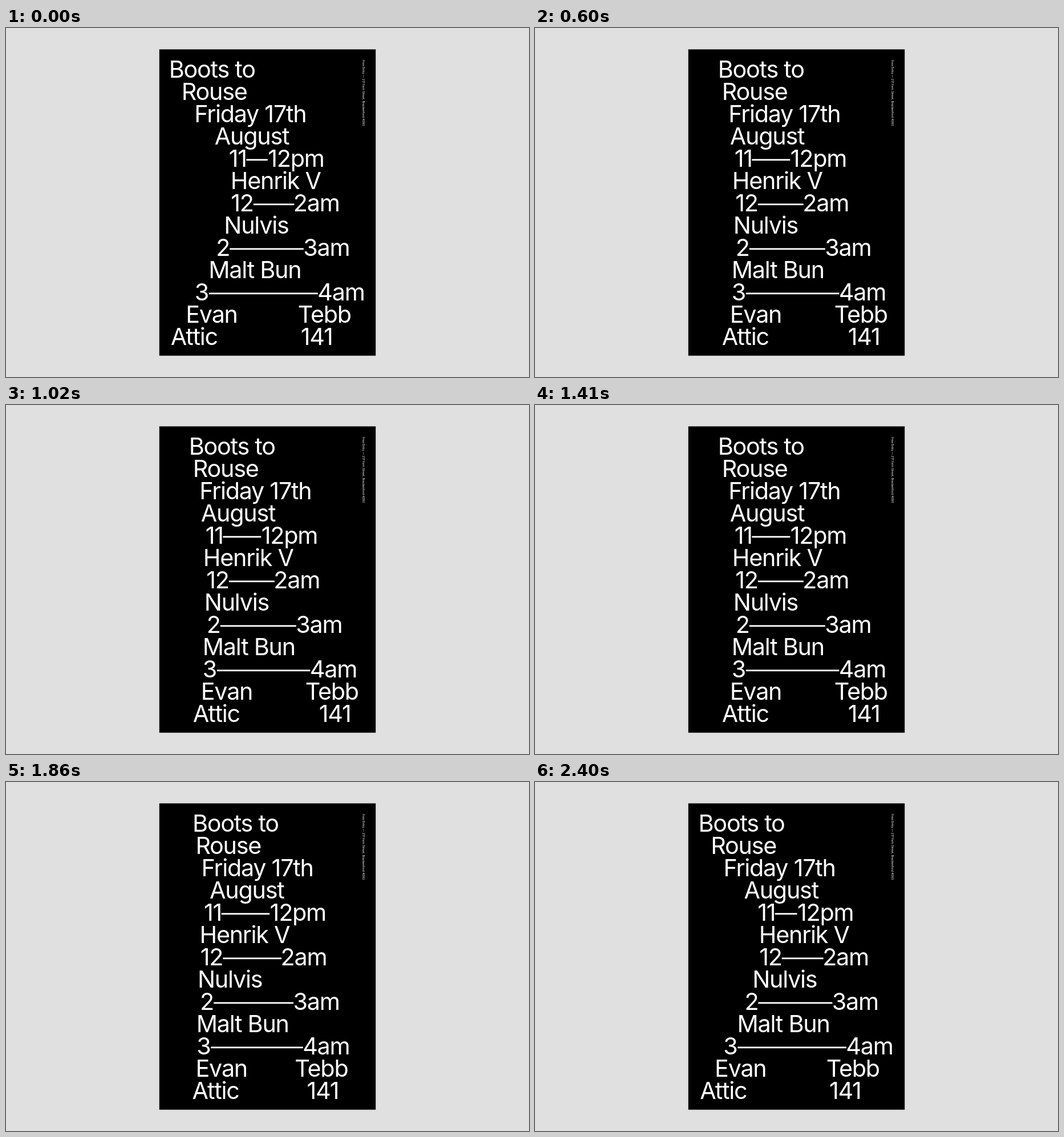
Animation, 917 px wide and 611 px high, one loop 2.43 s. Source, as an HTML page with a canvas:

```html
<!DOCTYPE html>
<html lang="en">
<head>
<meta charset="utf-8">
<style>
  html, body { margin: 0; width: 100%; height: 100%; overflow: hidden; background: #e0e0e0; }
  canvas { display: block; }
</style>
</head>
<body>
<canvas width="917" height="611"></canvas>
<script>
const ctx = document.querySelector('canvas').getContext('2d');
const STEP = 30, CYCLE = 27;
const FIRST_BASELINE = 86.7, LINE_HEIGHT = 39, INSET = 0.8;

// Each part: text, then its left edge at the start, middle and end of the swing.
const lines = [
  [['Boots to', 288, 323, 345]],
  [['Rouse', 310, 330, 348]],
  [['Friday 17th', 332.5, 341.5, 355.5]],
  [['August', 366, 342, 424]],
  [['11', 391, 350, 346], ['12pm', 459.5, 448, 524.5]],
  [['Henrik V', 396, 348, 328]],
  [['12', 394.5, 351.5, 309.5], ['2am', 506, 471.5, 541]],
  [['Nulvis', 384.5, 350, 299.5]],
  [['2', 370.5, 354, 299.5], ['3am', 522.5, 509.5, 489]],
  [['Malt Bun', 357.5, 347, 294]],
  [['3', 332, 346, 290.5], ['4am', 547.5, 534, 474.5]],
  [['Evan', 317.5, 344, 291.5], ['Tebb', 512, 525, 430]],
  [['Attic', 289, 328, 312], ['141', 517, 549, 435.5]]
];

const ease = k => (1 - Math.cos(2 * Math.PI * k / CYCLE)) / 2;
const bump = s => 16 * s * s * (1 - s) ** 2;
const MID = ease(7), LATE = ease(12);

// Eased swing between two poses, bowed so that it passes the middle one.
function edgeAt([, start, middle, end], s) {
  const travel = (end - start) / LATE;
  const bow = (middle - start - travel * MID) / bump(MID);
  return INSET + start + travel * s + bow * bump(s);
}

function setFont(size, spacing) {
  ctx.font = `${size}px Inter, "Liberation Sans", sans-serif`;
  ctx.letterSpacing = spacing + 'px';
}

// Draws text with its ink starting at x and returns where the ink ends.
function drawWord(text, x, y) {
  const box = ctx.measureText(text);
  const origin = x + box.actualBoundingBoxLeft;
  ctx.fillText(text, origin, y);
  return origin + box.actualBoundingBoxRight;
}

function drawPoster() {
  ctx.fillStyle = '#e0e0e0';
  ctx.fillRect(0, 0, 917, 611);
  ctx.fillStyle = '#000';
  ctx.fillRect(268.8, 37.4, 379.4, 536.3);
  ctx.fillStyle = '#fff';
  ctx.save();
  ctx.translate(625, 56);
  ctx.rotate(Math.PI / 2);
  setFont(5.25, -0.08);
  ctx.fillText('Free Entry — 217 Fern Street, Brackenford 4093', 0, 0);
  ctx.restore();
}

function draw(now) {
  const s = ease(Math.floor(now / STEP) % CYCLE);
  drawPoster();
  setFont(41.3, -1.25);
  lines.forEach(([left, right], i) => {
    const y = FIRST_BASELINE + i * LINE_HEIGHT;
    const leftEnd = drawWord(left[0], edgeAt(left, s), y);
    if (!right) return;
    const x = edgeAt(right, s);
    drawWord(right[0], x, y);
    if (/^\d+$/.test(left[0])) ctx.fillRect(leftEnd + 1, y - 13.3, x - leftEnd - 2.5, 2.8);
  });
}

const begin = performance.now();
function tick() {
  draw(performance.now() - begin);
  requestAnimationFrame(tick);
}
tick();
</script>
</body>
</html>
```
